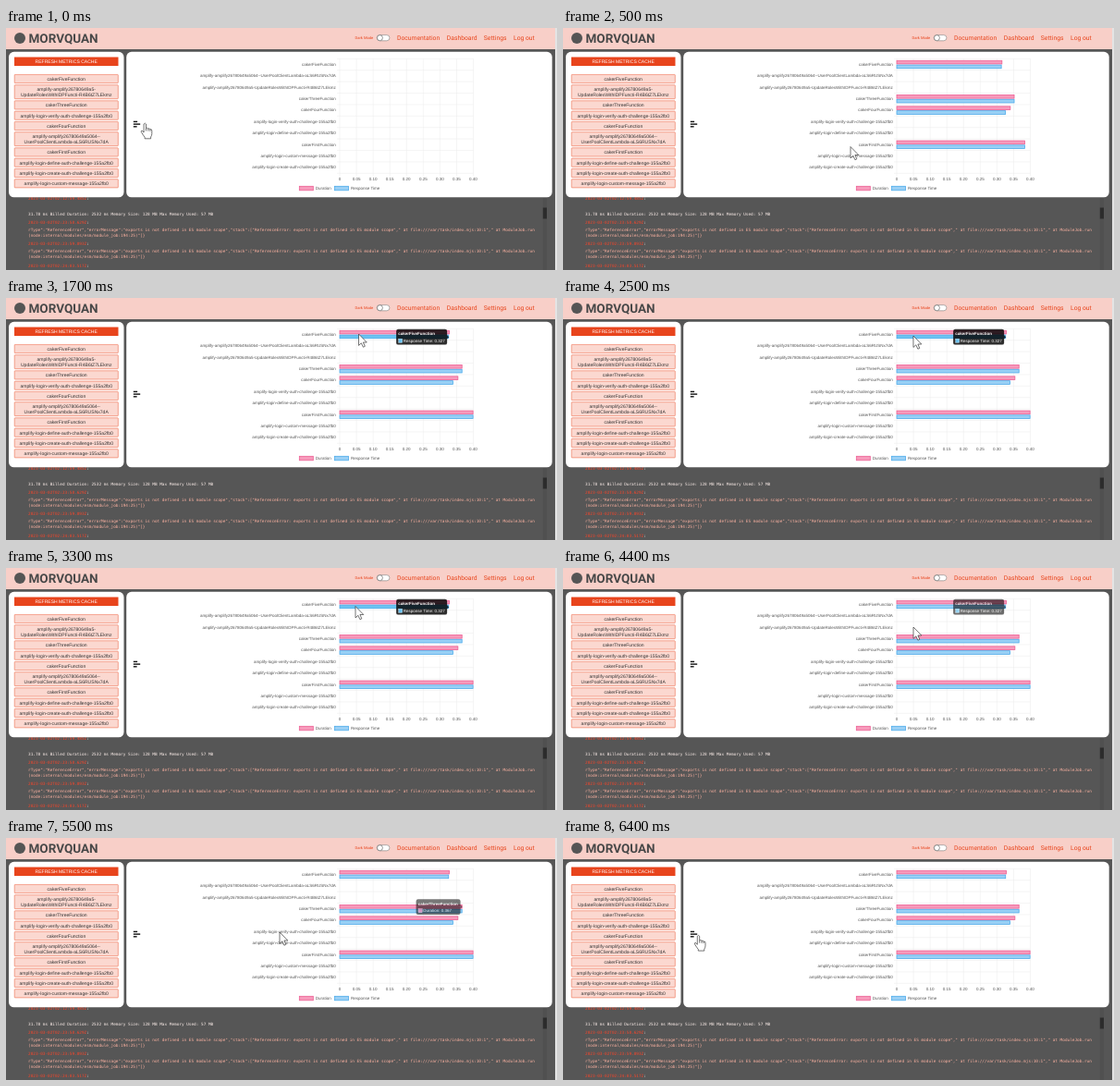
These frames come from a looping animation (596x262 px, 6.5 s). An HTML page:

```html
<!DOCTYPE html>
<html lang="en">
<head>
<meta charset="utf-8">
<title>Function metrics dashboard</title>
<style>
  html, body { margin: 0; width: 100%; height: 100%; overflow: hidden; background: #565656; }
  svg { display: block; width: 596px; height: 262px; }
  text { font-family: "Liberation Sans", Arial, sans-serif; text-rendering: geometricPrecision; white-space: pre; }
  .ui { font-family: Roboto, sans-serif; }
  .log { font-family: "DejaVu Sans Mono", monospace; font-size: 4.39px; fill: #fff0ec; }
  .log.error { fill: #ffb3a2; }
  .log.date { fill: #f8452a; }
  .chart { font-size: 4.51px; fill: #555; }
  .button { font-size: 5.06px; fill: #333; text-anchor: middle; }
</style>
</head>
<body>
<svg id="stage" viewBox="0 0 596 262"></svg>
<script>
const LOOP = 6500, STEP = 100;
const RED = '#e8441c', PINK = '#f8cfc8';
const stage = document.getElementById('stage');

function add(parent, tag, attrs, content) {
  const el = document.createElementNS('http://www.w3.org/2000/svg', tag);
  for (const key in attrs) el.setAttribute(key, attrs[key]);
  if (content !== undefined) el.textContent = content;
  parent.appendChild(el);
  return el;
}
const rect = (parent, x, y, width, height, fill, more) =>
  add(parent, 'rect', { x, y, width, height, fill, ...more });
const label = (parent, x, y, content, cls, more) =>
  add(parent, 'text', { x, y, class: cls, ...more }, content);

function drawLog() {
  const dates = ['2023-03-02T02:12:59.485Z', '2023-03-02T02:23:58.629Z',
                 '2023-03-02T02:23:59.893Z', '2023-03-02T02:24:03.517Z'];
  [185.6, 211.6, 235, 259].forEach((y, i) => {
    label(stage, 24, y, dates[i], 'log date');
    label(stage, 87.2, y, ':', 'log');
  });
  label(stage, 24, 202.8, '31.78 ms Billed Duration: 2532 ms Memory Size: 128 MB Max Memory Used: 57 MB', 'log');
  const scope = 'exports is not defined in ES module scope';
  const error = `rType":"ReferenceError","errorMessage":"${scope}","stack":["ReferenceError: ${scope}",` +
    '" at file:///var/task/index.mjs:10:1"," at ModuleJob.run';
  for (const y of [220, 243]) {
    label(stage, 24, y, error, 'log error');
    label(stage, 24, y + 6, '(node:internal/modules/esm/module_job:194:25)"]}', 'log error');
  }
  rect(stage, 580.8, 184, 4.2, 78, '#505050');
  rect(stage, 580.8, 194.5, 4.2, 12, '#2c2c2c');
}

function drawHeader() {
  rect(stage, 0, 0, 596, 23, PINK);
  rect(stage, 594, 0, 2, 262, '#e4e4e4');
  add(stage, 'circle', { cx: 15, cy: 11, r: 6, fill: '#555' });
  label(stage, 24.5, 16.4, 'MORVQUAN', 'ui', { 'font-size': 13.5, 'font-weight': 700, fill: '#484848' });
  label(stage, 377.5, 12.4, 'Dark Mode', 'ui', { 'font-size': 4.1, fill: RED });
  rect(stage, 401.3, 7.6, 13.6, 6.2, '#fff', { rx: 3.1, stroke: '#666', 'stroke-width': .5 });
  add(stage, 'circle', { cx: 404.4, cy: 10.7, r: 3, fill: '#fff', stroke: '#555', 'stroke-width': .6 });
  [[423, 'Documentation'], [476.8, 'Dashboard'], [516.8, 'Settings'], [549, 'Log out']]
    .forEach(([x, name]) => label(stage, x, 13, name, 'ui', { 'font-size': 6.77, fill: RED }));
}

function drawSidebar() {
  rect(stage, 3, 25.8, 124.5, 157.5, '#fff', { rx: 5.6 });
  rect(stage, 9, 31.5, 112.5, 9.5, RED);
  label(stage, 65.2, 38.1, 'REFRESH METRICS CACHE', 'button', { style: 'fill:#fff' });
  const login = name => [`amplify-login-${name}-155a2fb0`];
  const buttons = [
    ['cakerFiveFunction'],
    ['amplify-amplify26780649a5-', 'UpdateRolesWithIDPFuncti-R4B6tZ7LEkmz'],
    ['cakerThreeFunction'],
    login('verify-auth-challenge'),
    ['cakerFourFunction'],
    ['amplify-amplify26780649a5064--', 'UserPoolClientLambda-aLS6RUSNx7dA'],
    ['cakerFirstFunction'],
    login('define-auth-challenge'),
    login('create-auth-challenge'),
    login('custom-message')
  ];
  let y = 50.4;
  for (const lines of buttons) {
    const height = lines.length > 1 ? 15 : 9.2;
    rect(stage, 9.2, y, 112.1, height, '#fbd8d0', { stroke: RED, 'stroke-width': .45, rx: .6 });
    lines.forEach((line, i) => label(stage, 65.2, y + 6.4 + i * 5.8, line, 'button'));
    y += height + 2.1;
  }
}

// Chart geometry
const X0 = 361, SCALE = 361.25, TOP = 33.3, PITCH = 12.4, BAR = 4.46, BORDER = .75;
const SERIES = [
  { name: 'Duration', fill: '#f79abb', line: '#ec5a90', hover: '#f57ba9' },
  { name: 'Response Time', fill: '#9ad0f5', line: '#45a8ea', hover: '#6cc3f0' }
];
const rowY = row => TOP + PITCH * (row + .5);
const barY = (row, s) => rowY(row) + (s ? 2.4 : -2.4);
const bars = [];

function drawChart() {
  rect(stage, 130.2, 25.8, 460.5, 157.5, '#fff', { rx: 5.6 });
  [[101.4, 4.3], [104.1, 7.4], [106.8, 3.8]].forEach(([y, w]) =>
    rect(stage, 137.8, y - .7, w, 1.4, '#111'));

  const grid = [];
  for (let i = 0; i <= 8; i++) {
    const x = X0 + i * .05 * SCALE;
    grid.push(`M${x} ${TOP}V${TOP + 10 * PITCH + 3}`);
    label(stage, x, 165, i ? (i * .05).toFixed(2) : '0', 'chart', { 'text-anchor': 'middle' });
  }
  for (let i = 0; i <= 10; i++) grid.push(`M${X0 - 3} ${TOP + i * PITCH}H${X0 + .4 * SCALE}`);
  add(stage, 'path', { d: grid.join(''), stroke: '#e6e6e6', 'stroke-width': .4 });

  const rows = [
    ['cakerFiveFunction', .329, .327],
    ['amplify-amplify26780649a5064--UserPoolClientLambda-aLS6RUSNx7dA'],
    ['amplify-amplify26780649a5-UpdateRolesWithIDPFuncti-R4B6tZ7LEkmz'],
    ['cakerThreeFunction', .367, .367],
    ['cakerFourFunction', .355, .34],
    ['amplify-login-verify-auth-challenge-155a2fb0'],
    ['amplify-login-define-auth-challenge-155a2fb0'],
    ['cakerFirstFunction', .4, .4],
    ['amplify-login-custom-message-155a2fb0'],
    ['amplify-login-create-auth-challenge-155a2fb0']
  ];
  rows.forEach(([name, ...values], row) => {
    label(stage, 356.8, rowY(row) + 1.3, name, 'chart', { 'text-anchor': 'end' });
    values.forEach((value, s) => {
      const el = rect(stage, X0, barY(row, s) - (BAR - BORDER) / 2, 0, BAR - BORDER, SERIES[s].fill,
        { stroke: SERIES[s].line, 'stroke-width': BORDER });
      bars.push({ el, row, s, value });
    });
  });

  [317.3, 355.5].forEach((x, s) => {
    rect(stage, x, 171.3, 15, 4.5, SERIES[s].fill, { stroke: SERIES[s].line, 'stroke-width': BORDER });
    label(stage, x + 17.5, 175.1, SERIES[s].name, 'chart');
  });
}

function makeTooltip(row, s, title, value, width, shown, hidden) {
  const g = add(stage, 'g', { opacity: 0 });
  const tip = X0 + value * SCALE, x = tip - 2 - width, y = barY(row, s) + .3;
  rect(g, x, y - 8.4, width, 16.8, '#000', { rx: 2.2, 'fill-opacity': .82 });
  add(g, 'path', { d: `M${tip - 2} ${y - 2}l2 2l-2 2z`, 'fill-opacity': .82 });
  label(g, x + 2.2, y - 1.9, title, '', { 'font-size': 4.51, 'font-weight': 700, fill: '#fff' });
  rect(g, x + 2.4, y + 1.9, 4.3, 4.3, SERIES[s].hover, { stroke: '#fff', 'stroke-width': .3 });
  label(g, x + 7.6, y + 5.7, `${SERIES[s].name}: ${value}`, '', { 'font-size': 4.51, fill: '#fff' });
  return { g, row, s, shown, hidden };
}

drawLog();
drawHeader();
drawSidebar();
drawChart();
const tooltips = [
  makeTooltip(0, 1, 'cakerFiveFunction', .327, 55, 1450, 4340),
  makeTooltip(3, 0, 'cakerThreeFunction', .367, 48, 4650, 5430)
];

const pen = { fill: '#fff', stroke: '#2a2a2a', 'stroke-width': .65, 'stroke-linejoin': 'round' };
const arrow = add(stage, 'path', { ...pen, d: 'M0 0V12.4L2.8 9.8L4.9 14.2L6.8 13.3L4.9 9H8.8Z' });
const hand = add(stage, 'path', { ...pen,
  d: 'M-1.2 1Q0-.8 1.2 1V5.6Q2.4 4.6 3.5 6Q4.7 5.2 5.6 6.7Q7.5 6.2 7.5 8.2V11.5Q7.4 13.5 6.3 15V16.8H-.2V15.2' +
     'Q-1.8 13.3-4 9.6Q-4.4 7.8-2.8 8.2L-1.2 10ZM1.2 5.6V8.4M3.5 6V8.6M5.6 6.7V8.8' });

// Pointer path: time, x, y
const path = [
  [0, 150.3, 103], [200, 152, 104], [800, 470, 153], [900, 475, 155], [1050, 474, 150],
  [1500, 384, 40], [1700, 381.5, 39], [2400, 379, 41], [3300, 378, 41.5], [4150, 378, 42],
  [4400, 379, 64], [4700, 379, 73], [5200, 372, 74], [5500, 296, 102],
  [6100, 150, 105], [6400, 146.5, 105.3], [6500, 147, 105.3]
];
const clamp = v => Math.max(0, Math.min(1, v));

function pointerAt(t) {
  const i = path.findIndex(p => p[0] > t);
  const [t0, x0, y0] = path[i - 1], [t1, x1, y1] = path[i];
  const k = (t - t0) / (t1 - t0), e = k * k * (3 - 2 * k);
  return [x0 + (x1 - x0) * e, y0 + (y1 - y0) * e];
}

function render(t) {
  const grow = 1 - (1 - clamp(t / 900)) ** 4;
  for (const bar of bars) {
    const hovered = tooltips.some(p => p.row === bar.row && p.s === bar.s && t >= p.shown && t < p.hidden);
    bar.el.setAttribute('width', Math.max(0, bar.value * SCALE * grow - BORDER / 2));
    bar.el.setAttribute('fill', SERIES[bar.s][hovered ? 'hover' : 'fill']);
  }
  for (const tip of tooltips) {
    const opacity = Math.min(clamp((t - tip.shown) / 200), 1 - clamp((t - tip.hidden) / 200));
    tip.g.setAttribute('opacity', opacity);
  }
  const [x, y] = pointerAt(t);
  const overIcon = x < 156;
  hand.setAttribute('visibility', overIcon ? 'visible' : 'hidden');
  arrow.setAttribute('visibility', overIcon ? 'hidden' : 'visible');
  (overIcon ? hand : arrow).setAttribute('transform', `translate(${x} ${y})`);
}

const start = performance.now();
function tick() {
  const t = (performance.now() - start) % LOOP;
  render(Math.floor(t / STEP) * STEP);
  requestAnimationFrame(tick);
}
tick();
</script>
</body>
</html>
```
